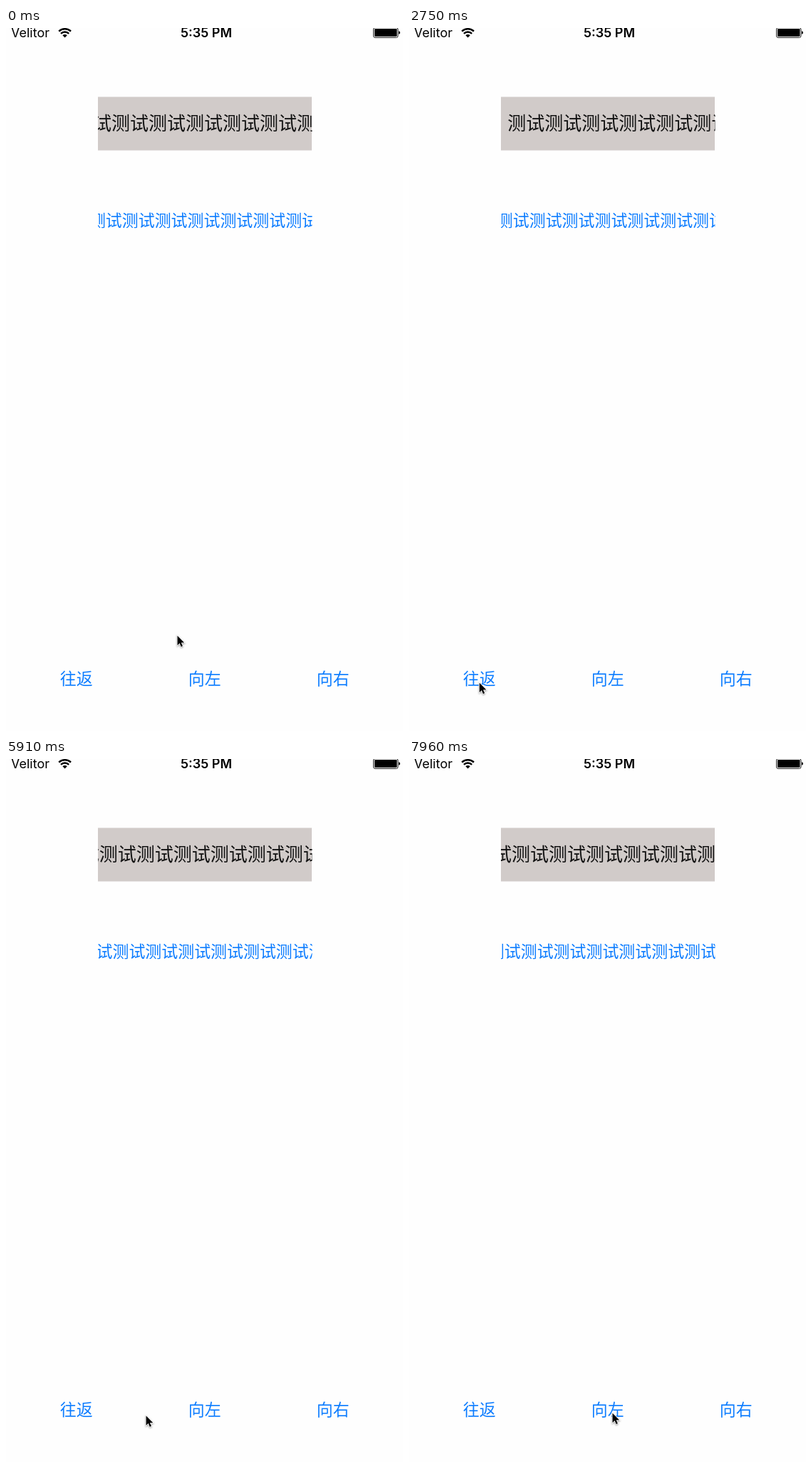
These frames come from a looping animation (557 px wide and 985 px high, 8000 ms). An HTML page:

```html
<!DOCTYPE html>
<html lang="zh-CN">
<head>
<meta charset="utf-8">
<title>Marquee labels</title>
<style>
  html, body { margin: 0; width: 100%; height: 100%; overflow: hidden; background: #fefefe; }
  svg { display: block; width: 557px; height: 985px; }
  .status { font: 18px Inter, Roboto, sans-serif; }
  .cjk { font-family: "Noto Sans CJK SC", "Noto Sans CJK", "Noto Sans CJK JP", sans-serif; }
  .label { font-size: 26px; fill: #111; }
  .blue { font-size: 22.95px; fill: #0d7dff; }
  .button { text-anchor: middle; }
  #cursor { filter: drop-shadow(0 1px 1px #0006); }
</style>
</head>
<body>
<svg viewBox="0 0 557 985">
  <clipPath id="marqueeClip"><rect x="129" y="96.5" width="300.5" height="184"/></clipPath>

  <g class="status">
    <text x="7" y="13">Velitor</text>
    <text x="281" y="13" text-anchor="middle" font-weight="600">5:35 PM</text>
  </g>
  <g fill="none" stroke="#000" stroke-width="2.4">
    <path d="M74.2 4.7A12 12 0 0 1 91 4.7"/>
    <path d="M77 7.8A7.8 7.8 0 0 1 88.2 7.8"/>
    <path d="M82.6 13.4L79.4 10.2A4.6 4.6 0 0 1 85.8 10.2Z" fill="#000" stroke="none"/>
  </g>
  <rect x="515.5" y="-.5" width="34.5" height="14" rx="2.5" fill="none" stroke="#222"/>
  <rect x="517" y="1" width="31.5" height="11" rx="1.2"/>
  <path d="M551 4.2Q553 4.8 553 6.5T551 8.8Z"/>

  <rect x="129" y="96.5" width="300" height="75" fill="#d1cbc9"/>
  <g class="cjk" clip-path="url(#marqueeClip)">
    <text id="label" class="label" y="143.4"></text>
    <text id="title" class="blue" y="278.2"></text>
  </g>

  <g class="cjk blue button">
    <text id="wander" x="98.8" y="919.7">往返</text>
    <text id="left" x="278.8" y="919.7">向左</text>
    <text x="458.8" y="919.7">向右</text>
  </g>
  <path id="cursor" d="M0 0V13.4L3.1 10.5L5.2 15.4L7.4 14.4L5.3 9.7H9.6Z"
        stroke="#fff" stroke-width="1.6" paint-order="stroke"/>
</svg>
<script>
const LOOP = 8;
const SPEED = 18.85;   // px per second
const RIGHTMOST = 143; // where a label turns back

// Pointer tip: a resting place, then the two buttons it visits.
const rest = { x: 240.5, y: 851.5 };
const onWander = { x: 98.8, y: 917.5 };
const onLeft = { x: 285.5, y: 916.5 };

const byId = id => document.getElementById(id);
const clamp01 = v => Math.min(1, Math.max(0, v));
const move = (id, x, y) => byId(id).setAttribute('transform', `translate(${x} ${y})`);

byId('label').textContent = byId('title').textContent = '测试'.repeat(14);

const wanderX = (t, turn) => RIGHTMOST - SPEED * Math.abs(t - turn);

function ease(t, start, end) {
  const k = clamp01((t - start) / (end - start));
  return k * k * (3 - 2 * k);
}

function bezier(u, a, b, c, d) {
  const v = 1 - u;
  const mix = axis => v * v * v * a[axis] + 3 * v * v * u * b[axis]
    + 3 * v * u * u * c[axis] + u * u * u * d[axis];
  return [mix('x'), mix('y')];
}

// The first trip overshoots below the button and hooks back; the second is nearly level.
function pointerAt(t) {
  return t < 4
    ? bezier(ease(t, 0.6, 1.84), rest, { x: 170, y: 915 }, { x: 24, y: 1000 }, onWander)
    : bezier(ease(t, 5.2, 6.6), onWander, { x: 160, y: 922 }, { x: 230, y: 921 }, onLeft);
}

// A pressed button dims at once and fades back after release.
function buttonOpacity(t, down) {
  return t < down ? 1 : 0.2 + 0.8 * clamp01((t - down - 0.08) / 0.35);
}

function draw(now) {
  const t = now / 1000 % LOOP;
  move('label', wanderX(t, 2.5), 0);
  move('title', wanderX(t, 3.82), 0);
  move('cursor', ...pointerAt(t));
  byId('wander').setAttribute('opacity', buttonOpacity(t, 2.28));
  byId('left').setAttribute('opacity', buttonOpacity(t, 7.36));
}

function tick() {
  draw(performance.now());
  requestAnimationFrame(tick);
}
tick();
</script>
</body>
</html>
```
